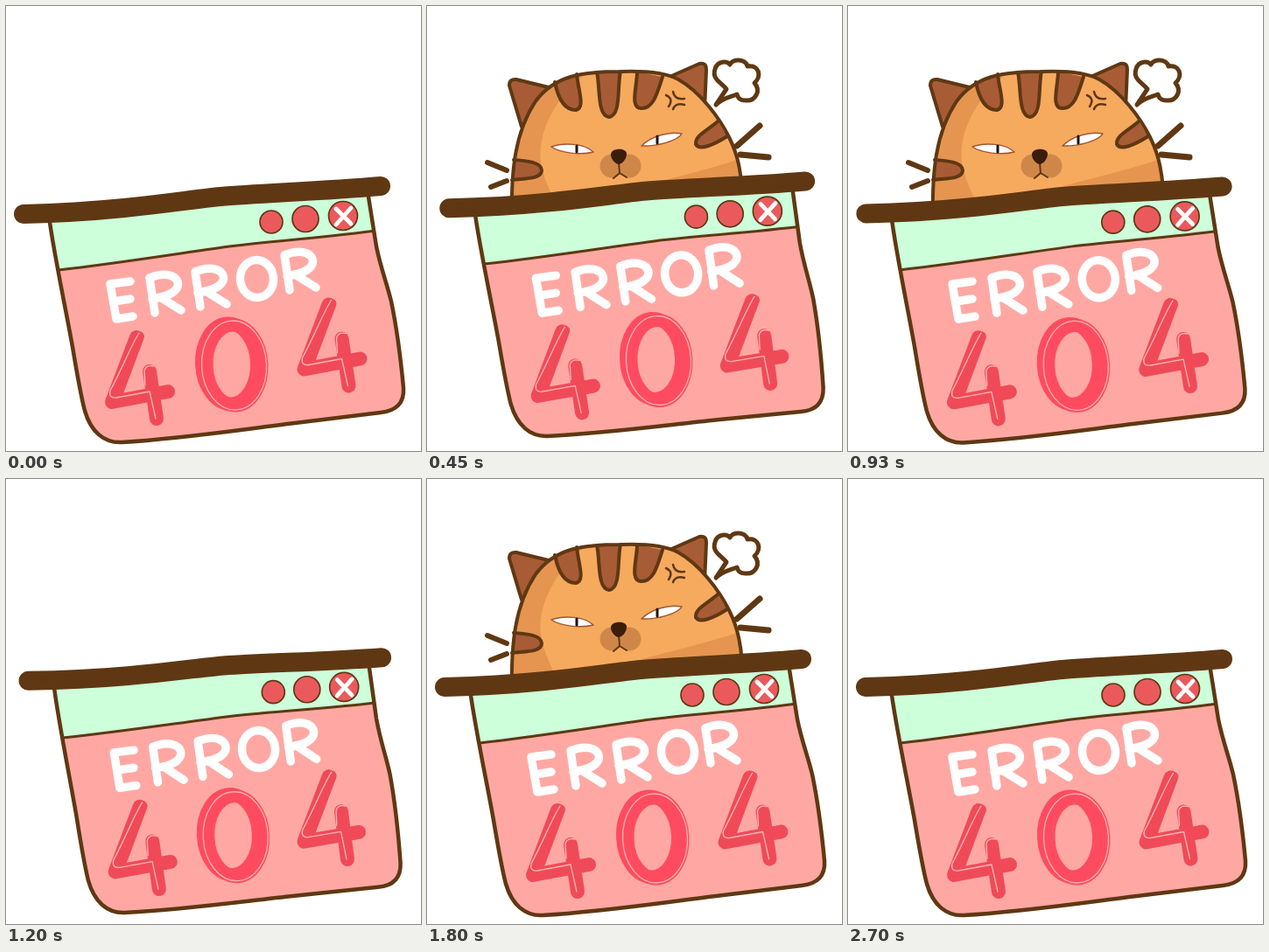
Animation of 474x509 px, one loop 2730 ms. Source, as an HTML page with a canvas:

```html
<!DOCTYPE html>
<html lang="en">
<head>
<meta charset="utf-8">
<title>Error 404</title>
<style>
  html, body { margin: 0; width: 474px; height: 509px; overflow: hidden; background: #fff; }
  canvas { display: block; }
</style>
</head>
<body>
<canvas id="stage" width="474" height="509" role="img" aria-label="ERROR 404"></canvas>
<script>
const ctx = document.getElementById('stage').getContext('2d');
ctx.lineCap = ctx.lineJoin = 'round';

const LOOP = 2730, STEP = 30, SWAY = 900, POPUP = 1350, HIDDEN = 170;
const BROWN = '#5f3813', PINK = '#ffa8a3', MINT = '#ccffda', RED = '#ea5a5c';
const FUR = '#f6aa5e', SHADE = '#e5954f', STRIPE = '#a85c35', MUZZLE = '#cf8749';
const FOUR = '#f04a59', ZERO = '#ff4b60', GLINT = '#ffb3b0';

// Corner offsets of the panel: lift peaks at half the sway, twist a quarter before and after.
const LIFT = { tl: [5.3, -6.7], tr: [4, -5.5], bl: [6.2, -7.6], br: [-1.5, -0.6] };
const TWIST = { tl: [2, -2.7], tr: [-2.5, 2.9], bl: [-0.3, 2.2], br: [-2.7, 3] };

const mix = (a, b, k) => a + (b - a) * k;
const blend = (c, u, v, axis) =>
  mix(mix(c.tl[axis], c.tr[axis], u), mix(c.bl[axis], c.br[axis], u), v);

function makeWarp(time) {
  const angle = time / SWAY * 2 * Math.PI;
  const lift = (1 - Math.cos(angle)) / 2, twist = Math.sin(angle);
  return (x, y) => {
    const u = (x - 10) / 430, v = (y + 0.077 * x - 239) / 260;
    const offset = axis => lift * blend(LIFT, u * u, v, axis) + twist * blend(TWIST, u, v, axis);
    return [x + offset(0), y + offset(1)];
  };
}

const still = (x, y) => [x, y];
let place = still;

function outline(d, dx = 0, dy = 0) {
  return new Path2D(d.replace(/(-?[\d.]+)[ ,](-?[\d.]+)/g,
    (_, x, y) => place(+x + dx, +y + dy).map(n => n.toFixed(2)).join(' ')));
}

function oval(x, y, rx, ry = rx, tilt = 0) {
  const path = new Path2D();
  path.ellipse(...place(x, y), rx, ry, tilt, 0, 2 * Math.PI);
  return path;
}

function paint(path, fill, stroke, width) {
  if (fill) {
    ctx.fillStyle = fill;
    ctx.fill(path);
  }
  if (stroke) {
    ctx.strokeStyle = stroke;
    ctx.lineWidth = width;
    ctx.stroke(path);
  }
}

const shape = (d, fill, width = 4) => paint(outline(d), fill, BROWN, width);
const line = (d, color, width, dx, dy) => paint(outline(d, dx, dy), null, color, width);

const HEAD = 'M97 240 C96 190 100 145 124 109 C146 79 178 75 222 75 ' +
  'C250 74 272 76 287 84 C312 98 334 128 345 150 C354 168 361 190 361 240 Z';

function drawPuff() {
  shape('M330 113 L342 95 C336 87 325 84 329 72 C332 62 343 63 346 67 ' +
    'C349 60 364 60 366 69 C379 67 383 80 374 88 C382 97 375 109 364 108 ' +
    'C356 108 355 104 354 101 C347 104 338 105 330 113 Z', '#fff', 5);
}

function drawHead() {
  shape('M108 138 L94 91 Q94 83 102 84 L147 95 Z', STRIPE);
  shape('M268 85 L311 66 Q319 64 319 73 L317 118 Z', STRIPE);

  const head = outline(HEAD);
  paint(head, FUR);
  ctx.save();
  ctx.clip(head);
  paint(outline('M90 230 L90 70 L190 70 C150 100 126 140 130 178 Q133 200 150 230 Z'), SHADE);
  paint(outline('M215 215 C265 199 320 189 365 172 L365 245 L215 245 Z'), SHADE);
  ctx.restore();

  shape('M146 87 C150 107 158 119 170 119 C181 116 173 98 171 78', STRIPE);
  shape('M194 76 C198 92 194 126 208 127 C222 125 217 92 221 75', STRIPE);
  shape('M240 75 C240 92 231 117 245 117 C259 117 263 99 269 81', STRIPE);
  shape('M332 132 C321 142 306 148 307 158 C311 166 327 159 343 149', STRIPE);
  shape('M99 176 C112 177 131 178 131 188 C131 198 112 197 97 199', STRIPE);
  paint(head, null, BROWN, 4);
}

function drawFace() {
  paint(oval(211, 183, 13.5), MUZZLE);
  paint(oval(231, 183, 13.5), MUZZLE);
  line('M219 179 L220 191 L213 197 M220 191 L228 196', BROWN, 2);
  paint(outline('M210 170 C210 162 228 162 228 169 C228 176 222 181 219 181 C216 181 210 176 210 170 Z'), '#3b1d0c');

  const rim = '#a4552f';
  paint(outline('M142 161 C156 156 180 157 190 167 C175 171 152 168 142 161 Z'), '#fff', rim, 1.5);
  paint(outline('M245 160 C256 149 276 143 291 146 C287 154 262 161 245 160 Z'), '#fff', rim, 1.5);
  line('M171 160 L171 167 M263 149 L263 157', '#25130a', 3);

  line('M273 102 Q282 106 276 115 M281 98 Q283 108 294 106 M281 118 Q284 110 294 113', BROWN, 2.5);
}

function drawCat(drop) {
  ctx.save();
  ctx.translate(0, drop);
  line('M69 179 L91 188 M73 207 L91 200', BROWN, 6);
  line('M354 160 L380 137 M358 170 L390 173', BROWN, 7);
  drawPuff();
  drawHead();
  drawFace();
  ctx.restore();
}

function drawFour(dx, dy) {
  line('M149 379 L121 453 L185 441 M164 418 L172 472', FOUR, 16, dx, dy);
  line('M152 378 L127 445', FOUR, 12, dx, dy);
  line('M152 374 C143 388 132 416 119 440 Q117 449 126 448 L164 441 L171 472 ' +
    'M159 434 L158 417 Q160 410 169 412', GLINT, 1.3, dx, dy);
}

function drawZero() {
  paint(oval(255, 409, 31.5, 46, -0.05), null, ZERO, 15);
  paint(oval(260.5, 411, 31.5, 46, -0.05), null, ZERO, 15);
  paint(oval(260.5, 411, 37, 51, -0.05), null, GLINT, 1.3);
}

function drawR(dx, dy) {
  line('M164 311 L170 351 M164 311 C186 302 199 311 196 321 ' +
    'C192 330 180 333 167 335 M176 333 L200 348', '#fff', 9.5, dx, dy);
}

function drawPanel() {
  const panel = outline('M49 240 C54 280 68 345 76 390 C81 420 85 444 90 463 ' +
    'C97 487 112 500 132 499 C200 495 265 485 330 477 L428 465 ' +
    'C446 463 455 454 454 437 C451 405 445 362 440 338 C435 317 428 300 423 275 L413 212 Z');
  paint(panel, PINK);
  ctx.save();
  ctx.clip(panel);
  shape('M40 304 L60 302 C130 294 190 284 255 275 C310 268 365 265 430 256 L425 190 L40 220 Z', MINT, 3);
  ctx.restore();
  paint(panel, null, BROWN, 4.5);

  paint(oval(303, 247, 13), RED, BROWN, 1.7);
  paint(oval(342, 243.5, 15), RED, BROWN, 1.7);
  paint(oval(385, 240, 16.5), RED, BROWN, 1.7);
  line('M377 232 L394 249 M394 231 L377 250', '#fff', 4.8);

  line('M142 315 L119 318 L126 358 L145 355 M123 338 L142 335', '#fff', 9.5);
  drawR(0, 0);
  drawR(52, -7);
  paint(oval(286.5, 312, 19, 21.5, -0.1), null, '#fff', 9.5);
  drawR(154, -26);

  drawFour(0, 0);
  drawZero();
  drawFour(219.5, -37.5);

  line('M20 238 C60 237 95 235 135 231 C185 226 215 221 245 218 C290 214 360 212 428 206', BROWN, 22);
}

// The cat pops up with an ease-out, waits, and drops the same way in reverse.
function catDrop(time) {
  const phase = time % POPUP;
  const fromEnd = Math.min(phase, POPUP - phase);
  const rise = Math.min(Math.max((fromEnd - 150) / 240, 0), 1);
  return HIDDEN * (1 - rise) ** 3;
}

function render(now) {
  const time = Math.floor(now % LOOP / STEP) * STEP;
  ctx.fillStyle = '#fff';
  ctx.fillRect(0, 0, 474, 509);

  const drop = catDrop(time);
  place = still;
  if (drop < HIDDEN) drawCat(drop);

  place = makeWarp(time);
  drawPanel();
}

let start;
function tick(now) {
  start ??= now;
  render(now - start);
  requestAnimationFrame(tick);
}
render(0);
requestAnimationFrame(tick);
</script>
</body>
</html>
```
